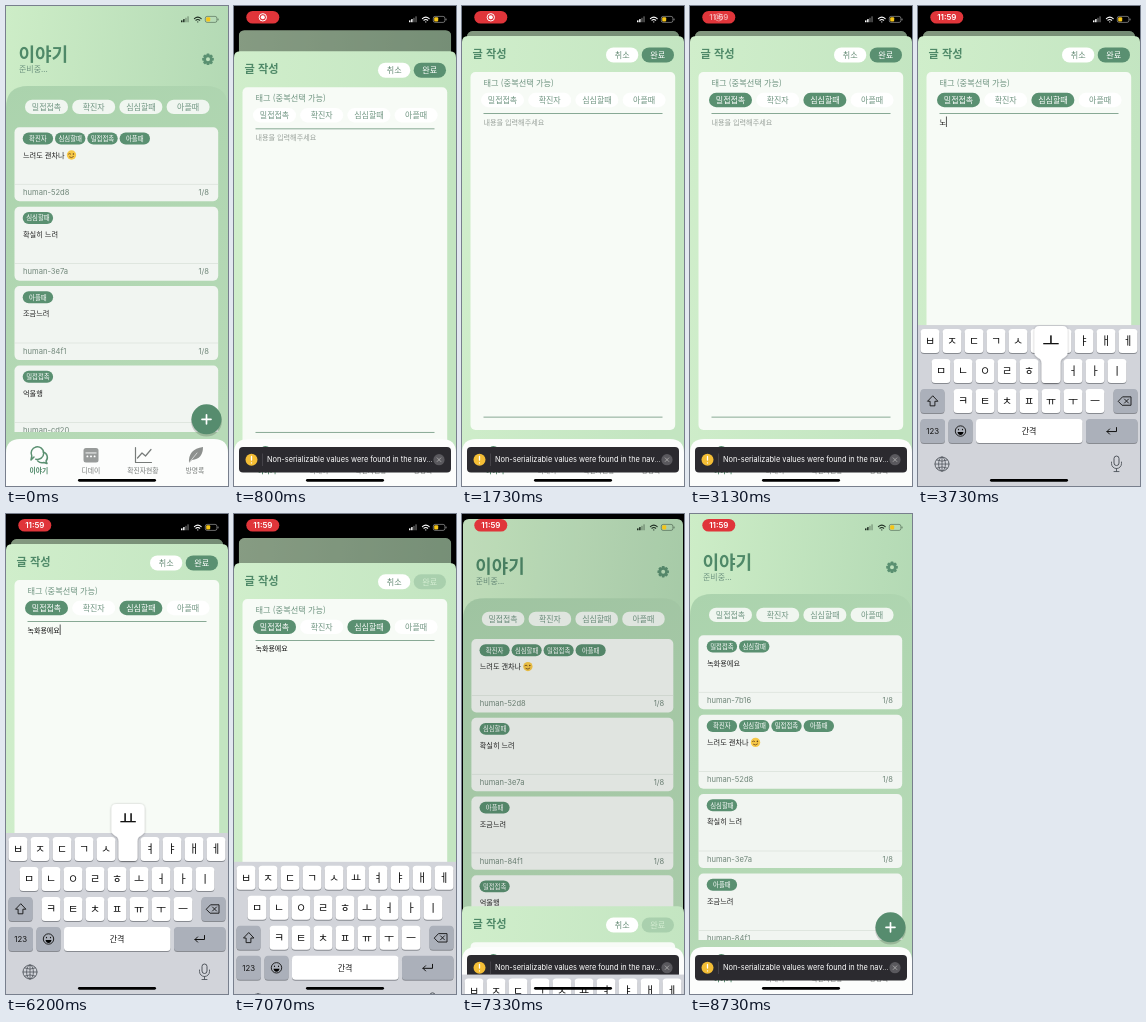
An HTML page that plays this animation: 222 by 480 pixels, repeating every 8.87 s.

```html
<!DOCTYPE html>
<html lang="ko">
<head>
<meta charset="utf-8">
<style>
html, body { margin: 0; width: 100%; height: 100%; overflow: hidden; background: #000; }
svg { display: block; width: 100%; height: 100%; }
text { font-family: "Noto Sans CJK KR", "Noto Sans CJK", sans-serif; white-space: pre; }
.latin { font-family: Inter, "Noto Sans CJK KR", sans-serif; }
</style>
</head>
<body>
<svg id="stage" viewBox="0 0 222 480"></svg>
<script>
const LOOP = 8870;
const GREEN = '#5a9071', TITLE = '#4f8968', MUTED = '#6f9480';
const stage = document.getElementById('stage');

// Markup helpers; text is placed by its vertical centre.
const text = (x, y, size, fill, str, extra = '') =>
  `<text x="${x}" y="${y + size * 0.37}" font-size="${size}" fill="${fill}" ${extra}>${str}</text>`;
const mid = (x, y, size, fill, str, extra = '') => text(x, y, size, fill, str, `text-anchor="middle" ${extra}`);
const rect = (x, y, w, h, r, fill, extra = '') =>
  `<rect x="${x}" y="${y}" width="${w}" height="${h}" rx="${r}" fill="${fill}" ${extra}/>`;
const circle = (x, y, r, fill, extra = '') => `<circle cx="${x}" cy="${y}" r="${r}" fill="${fill}" ${extra}/>`;
const stroke = (d, color, width = 1, extra = '') =>
  `<path d="${d}" fill="none" stroke="${color}" stroke-width="${width}" stroke-linecap="round" stroke-linejoin="round" ${extra}/>`;
const group = (id, body, extra = '') => `<g id="${id}" ${extra}>${body}</g>`;

const TAGS = ['밀접접촉', '확진자', '심심할때', '아플때'];
const chipX = i => 19 + i * 47.2;
const PITCH = 79.4;

function wink(x, y) {
  return circle(x, y, 4.7, '#f7c948') +
    stroke(`M${x - 3} ${y - 1}q1.2 -1 2.2 0M${x - 2} ${y + 2}q2.2 1.6 4 -.4`, '#6b4420', 0.8) +
    circle(x + 1.9, y - 1, 0.8, '#6b4420');
}

function card(row, tags, body, author, extra = '') {
  const y = 121.3 + row * PITCH;
  return rect(8.5, y, 203.7, 74, 5, '#f1f5f1') +
    tags.map((t, i) => rect(16.7 + i * 32.3, y + 5.2, 30.4, 12, 6, GREEN) +
      mid(31.9 + i * 32.3, y + 11.2, 6.4, '#fff', TAGS[t])).join('') +
    text(17, y + 27.7, 7.2, '#222', body) + extra +
    rect(8.5, y + 56.6, 203.7, 0.6, 0, '#d3dcd4') +
    text(17, y + 64.8, 7.6, '#71877a', author, 'class="latin"') +
    text(203, y + 64.8, 7.6, '#71877a', '1/8', 'class="latin" text-anchor="end"');
}

function gear(x, y) {
  const teeth = [0, 45, 90, 135].map(a =>
    rect(x - 1.5, y - 5.8, 3, 11.6, 0.8, GREEN, `transform="rotate(${a} ${x} ${y})"`)).join('');
  return teeth + circle(x, y, 3.2, '#bfe2bd', `stroke="${GREEN}" stroke-width="2.4"`);
}

function listScreen() {
  const chips = TAGS.map((t, i) => rect(chipX(i), 93.7, 43, 14.4, 7.2, '#f0f6f0') +
    mid(chipX(i) + 21.5, 100.9, 8, MUTED, t)).join('');
  const posts = card(0, [1, 2, 0, 3], '느려도 괜차나', 'human-52d8', wink(65.5, 149)) +
    card(1, [2], '확실히 느려', 'human-3e7a') +
    card(2, [3], '조금느려', 'human-84f1') +
    card(3, [0], '억울행', 'human-cd20');
  return rect(0, 0, 222, 480, 0, 'url(#sky)') +
    text(12.5, 48, 18, TITLE, '이야기', 'font-weight="900"') +
    text(13, 63, 8, MUTED, '준비중...') + gear(202, 53.3) +
    '<path d="M0 480V102Q0 80 22 80H200Q222 80 222 102V480Z" fill="url(#panel)"/>' + chips +
    `<g clip-path="url(#feed)">${group('posts', posts)}${
      group('newPost', card(0, [0, 2], '녹화용에요', 'human-7b16'))}</g>` +
    circle(200.5, 415, 15.5, '#000', 'opacity=".16"') + circle(200.5, 413.3, 15, '#568c6e') +
    stroke('M196 413.3h9M200.5 408.8v9', '#fff', 1.7);
}

function tabBar() {
  const labels = ['이야기', '디데이', '확진자현황', '방명록'];
  const gray = '#989b9a';
  return '<path d="M0 480V447Q0 433 14 433H208Q222 433 222 447V480Z" fill="#fcfdfc"/>' +
    stroke('M28 451l-3 3l.8 -4a6.3 6.3 0 1 1 4 3.2M37 446a5.5 5.5 0 0 1 3 9l1 2.5l-3.2 -1a6 6 0 0 1 -6 -1.5', GREEN, 1.5) +
    rect(77.5, 442, 15, 14.5, 2.5, gray) + rect(79.5, 446.5, 11, 0.9, 0, '#fff') +
    [0, 1, 2].map(i => rect(80.5 + i * 3.6, 449.5, 1.8, 1.8, 0.4, '#fff')).join('') +
    stroke('M129.5 441.5v15h16M131.5 452l4.5 -5l3.5 3l5.5 -6.5', '#777b79', 1.2) +
    '<path d="M183 457Q182 443 197 441Q197 453 186 454Z" fill="#8d908e"/>' +
    stroke('M182.5 457.5L191 447', '#fff', 0.6) +
    labels.map((t, i) => mid(33 + i * 52, 464, 6.8, i ? '#777b79' : TITLE, t, `font-weight="${i ? 400 : 800}"`)).join('');
}

function modal() {
  const chips = TAGS.map((t, i) => group('tag' + i,
    rect(chipX(i), 86.8, 43, 14.4, 7.2, '#fff') + mid(chipX(i) + 21.5, 94, 8, MUTED, t))).join('');
  return '<path d="M0 480V36Q0 30 6 30H216Q222 30 222 36V480Z" fill="url(#sheet)"/>' +
    text(10.5, 48, 11.2, TITLE, '글 작성', 'font-weight="700"') +
    rect(144, 41.4, 32.3, 15, 7.5, '#fff') + mid(160.2, 49, 8.1, '#658b75', '취소') +
    group('done', rect(179.7, 41.4, 32.3, 15, 7.5, GREEN) + mid(195.8, 49, 8.1, '#fff', '완료')) +
    rect(8.5, 66, 204.7, 358, 5, '#f7fbf6') +
    text(21.5, 77, 8.2, MUTED, '태그 (중복선택 가능)') + chips +
    rect(21.5, 107.2, 179, 0.8, 0, '#6d957d') + rect(21.5, 410.7, 179, 0.8, 0, '#6d957d') +
    text(21.5, 116, 7.1, '#98a09a', '내용을 입력해주세요', 'id="hint"') +
    text(21.5, 116, 7, '#111', '', 'id="typed"') + rect(0, 110.5, 0.9, 10.5, 0, '#444', 'id="caret"');
}

const ROWS = [['ㅂㅈㄷㄱㅅㅛㅕㅑㅐㅔ', 12], ['ㅁㄴㅇㄹㅎㅗㅓㅏㅣ', 23], ['ㅋㅌㅊㅍㅠㅜㅡ', 45]];
const rowTop = row => 323 + row * 30;
const keyPlace = {};
ROWS.forEach(([letters, x0], row) =>
  [...letters].forEach((c, i) => keyPlace[c] = { x: x0 + i * 22, y: rowTop(row) }));

const key = (x, y, w, fill = '#fff', extra = '') =>
  rect(x, y + 0.9, w, 24, 3.5, '#888b91') + rect(x, y, w, 24, 3.5, fill, extra);

function keyboard() {
  const dark = '#abb0ba', ink = '#111';
  const letters = Object.entries(keyPlace).map(([c, p]) =>
    key(p.x - 9.4, p.y, 18.8) + mid(p.x, p.y + 12, 11, ink, c)).join('');
  return rect(0, 319, 222, 200, 0, '#d2d4da') + letters +
    key(2.5, 383, 24, dark) + key(195.5, 383, 24, dark, 'id="erase"') +
    key(2.5, 413, 24.5, dark) + key(30.5, 413, 24, dark) + key(58, 413, 106.5) + key(168, 413, 51.5, dark) +
    stroke('M14.5 390l-5 5.2h2.6v4.6h4.8v-4.6h2.6z', ink, 0.9) +
    stroke('M200.5 395l4 -4.2h8.5v8.4h-8.5zM206.5 393l4 4M210.5 393l-4 4', ink, 0.9) +
    mid(14.7, 425, 7.8, ink, '123', 'class="latin"') + mid(111, 425, 8, ink, '간격') +
    circle(42.5, 425, 5.2, 'none', `stroke="${ink}" stroke-width=".9"`) +
    stroke('M40.5 423.2v.5M44.5 423.2v.5', ink, 1.1) +
    '<path d="M39.5 426h6q-.6 3 -3 3t-3 -3z"/>' +
    stroke('M198.5 421.5v4h-9.5m2.6 -2.6l-2.6 2.6l2.6 2.6', ink, 1) +
    stroke('M17 458h14M24 451v14M18.8 454q5.2 2.4 10.4 0M18.8 462q5.2 -2.4 10.4 0', '#50555c', 0.8) +
    circle(24, 458, 7, 'none', 'stroke="#50555c" stroke-width=".9"') +
    '<ellipse cx="24" cy="458" rx="3.4" ry="7" fill="none" stroke="#50555c" stroke-width=".8"/>' +
    rect(196, 450, 5, 9.5, 2.5, 'none', 'stroke="#50555c" stroke-width="1"') +
    stroke('M193.5 456v1.5a5 5 0 0 0 10 0v-1.5M198.5 462.5v3M196 465.5h5', '#50555c', 0.9) +
    group('popup', '<path fill="#fff" filter="url(#soft)"/>' + mid(0, 0, 19, ink, ''));
}

function toast() {
  return rect(5, 441, 212, 25.5, 4, '#2b2a2f') + circle(17.5, 453.7, 6, '#f3bd35') +
    stroke('M17.5 450.5v3.6M17.5 456.8v.1', '#fff', 1.3) + rect(28, 447.5, 0.6, 12.5, 0, '#55545a') +
    text(33, 453.7, 7.4, '#fff', 'Non-serializable values were found in the nav...', 'class="latin"') +
    circle(205, 453.7, 5.6, '#5a595e') + stroke('M203.2 451.9l3.6 3.6M206.8 451.9l-3.6 3.6', '#aaa', 0.9);
}

function statusBar() {
  const bars = [2, 3.2, 4.6, 6].map((h, i) =>
    rect(175 + i * 2.1, 16.3 - h, 1.5, h, 0.4, 'currentColor', i > 1 ? 'opacity=".35"' : '')).join('');
  return bars + stroke('M188.4 12.6q3.4 -3 6.8 0M189.9 14.2q1.9 -1.5 3.8 0M191.8 15.8v.1', 'currentColor', 1.1) +
    rect(199.3, 10.4, 11.6, 6, 1.8, 'none', 'stroke="currentColor" stroke-width=".7" opacity=".6"') +
    rect(200.2, 11.3, 4, 4.2, 1, '#f5c518') + rect(211.6, 12.4, 0.9, 2, 0.4, 'currentColor', 'opacity=".6"') +
    group('pill', rect(12.3, 5, 33, 12.6, 6.3, '#e0353a') +
      group('record', circle(28.8, 11.3, 3.7, 'none', 'stroke="#fff" stroke-width="1"') + circle(28.8, 11.3, 2, '#fff')) +
      mid(28.8, 11.3, 8, '#fff', '11:59', 'class="latin" font-weight="600" id="clock"'));
}

const gradient = (id, dir, a, b) =>
  `<linearGradient id="${id}" ${dir}><stop stop-color="${a}"/><stop offset="1" stop-color="${b}"/></linearGradient>`;
stage.innerHTML = '<defs>' +
  gradient('sky', 'x2="1" y2=".25"', '#cdedc7', '#b3d9b4') +
  gradient('panel', 'x2=".3" y2="1"', '#abd3ad', '#b7dab7') +
  gradient('sheet', 'x2="1" y2=".2"', '#d0eecb', '#c3e5c1') +
  '<clipPath id="feed"><path d="M0 80h222v346H0z"/></clipPath>' +
  '<clipPath id="corners"><rect width="222" height="480" rx="6"/></clipPath>' +
  '<filter id="soft" x="-30%" y="-30%" width="160%" height="160%"><feDropShadow dx="0" dy=".5" stdDeviation="1.2" flood-opacity=".35"/></filter></defs>' +
  rect(0, 0, 222, 480, 0, '#000') +
  group('back', `<g id="backClip">${listScreen()}${rect(0, 0, 222, 480, 0, '#000', 'id="dim"')}</g>`) +
  group('modal', modal()) + tabBar() + group('toast', toast()) + group('keyboard', keyboard()) +
  group('status', statusBar()) + rect(72, 473, 78, 2.7, 1.35, '#000');

const el = {};
stage.querySelectorAll('[id]').forEach(n => el[n.id] = n);
const show = (node, on) => node.setAttribute('visibility', on ? 'inherit' : 'hidden');
const move = (node, y) => node.setAttribute('transform', `translate(0 ${y})`);
const clamp = v => Math.max(0, Math.min(1, v));

// Critically damped spring, 0 to 1.
function spring(t, start, rate) {
  const u = Math.max(0, t - start) * rate;
  return 1 - (1 + u) * Math.exp(-u);
}

const KEYS = [
  [3490, 'ㄴ', 'ㄴ'], [3660, 'ㅗ', '노'], [3900, 'ㄱ', '녹'], [4080, 'ㅎ', '녹ㅎ'], [4250, 'ㅗ', '녹호'],
  [4400, 'ㅏ', '녹화'], [4560, 'ㅇ', '녹황'], [4700, 'ㅇ', '녹황ㅇ'], [4700, 'ㅇ', '녹화ㅇ'], [4780, 'ㅛ', '녹화요'],
  [4860, 'ㅇ', '녹화용'], [4970, 'ㅇ', '녹화용ㅇ'], [5080, 'ㅔ', '녹화용에'], [5330, 'ㅇ', '녹화용엥'],
  [5480, 'ㅠ', '녹화용에유'], [5700, '⌫', '녹화용에ㅇ'], [6120, 'ㅛ', '녹화용에요']
].filter(([, , s]) => !s.includes('녹황') && s !== '녹화ㅇ' || s === '녹화ㅇ');
const PRESS = 120;
const TAG_TAPS = { 0: 1970, 2: 2450 };
const OPEN = 300, CLOSE = 7040, SUBMIT = 6930, REFRESH = 8200;

function drawPopup(letter) {
  const p = keyPlace[letter];
  show(el.popup, !!p);
  if (!p) return;
  const left = Math.min(Math.max(p.x - 16.5, 2), 187), right = left + 33;
  const kl = p.x - 9.4, kr = p.x + 9.4, top = p.y - 33, low = p.y - 6, bottom = p.y + 24;
  const [shape, label] = el.popup.children;
  shape.setAttribute('d', `M${left + 5} ${top}H${right - 5}q5 0 5 5V${low}C${right} ${low + 5} ${kr} ${low + 4} ${kr} ${low + 10}` +
    `V${bottom - 3.5}q0 3.5 -3.5 3.5H${kl + 3.5}q-3.5 0 -3.5 -3.5V${low + 10}C${kl} ${low + 4} ${left} ${low + 5} ${left} ${low}V${top + 5}q0 -5 5 -5Z`);
  label.textContent = letter;
  label.setAttribute('x', left + 16.5);
  label.setAttribute('y', top + 22);
}

function render(t) {
  const up = t < CLOSE ? spring(t, OPEN, 0.0104) : 1 - spring(t, CLOSE, 0.0104);
  const open = up > 0.001;
  move(el.modal, 450 * (1 - up));
  show(el.modal, open);
  const s = 1 - 0.045 * up;
  el.back.setAttribute('transform', `translate(${111 * (1 - s)} ${25 * up}) scale(${s})`);
  open ? el.backClip.setAttribute('clip-path', 'url(#corners)') : el.backClip.removeAttribute('clip-path');
  el.dim.setAttribute('opacity', 0.36 * up);

  show(el.newPost, t >= REFRESH);
  move(el.posts, t >= REFRESH ? PITCH : 0);
  show(el.toast, t >= 340);

  el.status.setAttribute('color', up > 0.5 ? '#fff' : '#1c2b20');
  show(el.pill, t >= 70);
  const clock = clamp((t - 2900) / 400);
  el.record.setAttribute('opacity', 1 - clock);
  el.clock.setAttribute('opacity', clock);

  for (const i in TAG_TAPS) {
    const node = el['tag' + i], on = t >= TAG_TAPS[i];
    node.children[0].setAttribute('fill', on ? GREEN : '#fff');
    node.children[1].setAttribute('fill', on ? '#fff' : MUTED);
    node.setAttribute('opacity', 0.3 + 0.7 * clamp(Math.abs(t - TAG_TAPS[i]) / 150));
  }
  el.done.setAttribute('opacity', t < SUBMIT ? 1 : 1 - 0.75 * clamp((t - SUBMIT) / 120));

  const kb = t < 7000 ? spring(t, 3150, 0.018) : 1 - spring(t, 7000, 0.0107);
  move(el.keyboard, 163 * (1 - kb));
  show(el.keyboard, kb > 0.002);

  const last = KEYS.filter(k => k[0] <= t).pop();
  const pressed = last && t - last[0] < PRESS ? last[1] : '';
  drawPopup(pressed);
  el.erase.setAttribute('fill', pressed === '⌫' ? '#fff' : '#abb0ba');
  const typed = last ? last[2] : '';
  el.typed.textContent = typed;
  show(el.hint, !typed);
  const idle = t - (last ? last[0] : 3200);
  show(el.caret, open && t > 3200 && t < SUBMIT && (idle < 500 || idle % 1000 < 500));
  el.caret.setAttribute('x', 21.5 + typed.length * 6.44);
}

const begin = performance.now();
function frame() {
  render((performance.now() - begin) % LOOP);
  requestAnimationFrame(frame);
}
render(0);
requestAnimationFrame(frame);
</script>
</body>
</html>
```
